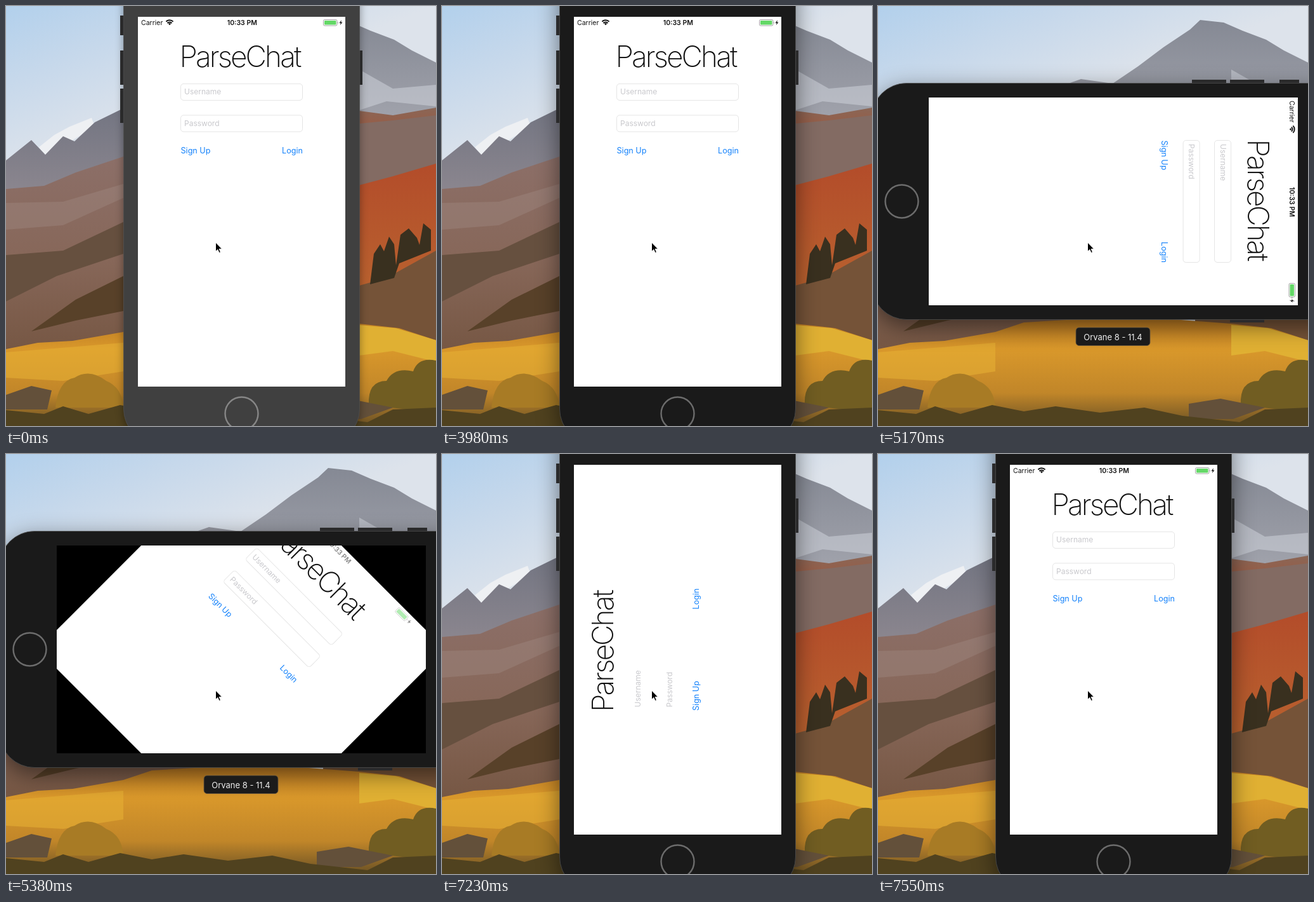
An HTML page for the animation above (8000 ms loop, 678x661 px).

```html
<!DOCTYPE html>
<html lang="en">
<head>
<meta charset="utf-8">
<title>Rotating login screen</title>
<style>
  html, body { margin: 0; width: 100%; height: 100%; overflow: hidden; }
  svg { display: block; width: 678px; height: 661px; font-family: Inter, Roboto, sans-serif; }
  .title { font-size: 46px; font-weight: 200; letter-spacing: -2.9px; fill: #111; }
  .hint { font-size: 12px; fill: #c9c9cd; }
  .link { font-size: 12.6px; fill: #1482fb; }
  .bar { font-size: 10.5px; fill: #111; }
  .label { font-size: 13px; fill: #eee; }
  .mid { text-anchor: middle; }
  .end { text-anchor: end; }
</style>
</head>
<body>
<svg viewBox="0 0 678 661">
  <defs>
    <linearGradient id="sky" gradientUnits="userSpaceOnUse" x1="0" y1="0" x2="90" y2="230">
      <stop stop-color="#b2d0ec"/><stop offset=".45" stop-color="#c6d8eb"/><stop offset="1" stop-color="#dde3eb"/>
    </linearGradient>
    <linearGradient id="peak" x2="0" y2="1">
      <stop stop-color="#858994"/><stop offset=".55" stop-color="#a0a2ab"/><stop offset="1" stop-color="#80706c"/>
    </linearGradient>
    <linearGradient id="ridge" x2="0" y2="1">
      <stop stop-color="#737582"/><stop offset="1" stop-color="#928b92"/>
    </linearGradient>
    <linearGradient id="slope" x2="0" y2="1">
      <stop stop-color="#8c6f68"/><stop offset=".5" stop-color="#876759"/><stop offset="1" stop-color="#745541"/>
    </linearGradient>
    <linearGradient id="autumn" x2="0" y2="1">
      <stop stop-color="#8a6656"/><stop offset=".3" stop-color="#b34c2a"/><stop offset="1" stop-color="#b9622f"/>
    </linearGradient>
    <linearGradient id="grove" x2="0" y2="1">
      <stop stop-color="#b87722"/><stop offset=".3" stop-color="#d9982b"/>
      <stop offset=".7" stop-color="#c18629"/><stop offset="1" stop-color="#6a5125"/>
    </linearGradient>
    <clipPath id="glass"><rect x="-163.5" y="-291" width="327" height="582"/></clipPath>
  </defs>

  <!-- landscape backdrop -->
  <rect width="678" height="661" fill="url(#sky)"/>
  <path fill="url(#peak)" d="M300 122L320 115 370 122 410 95 450 65 492 37 508 22 545 26 575 39 612 53 640 70 678 89V300H300Z"/>
  <path fill="#d3d7df" opacity=".5" d="M557 100L610 130 678 124V158L600 150 557 164Z"/>
  <path fill="url(#autumn)" d="M300 300L557 165 610 172 678 160V450H300Z"/>
  <path fill="#836b63" d="M557 185L610 180 678 172V248L610 268 557 282Z"/>
  <path fill="#eef0f3" d="M52 222L76 203 100 190 135 176 140 190 90 220 62 236Z"/>
  <path fill="url(#ridge)" d="M0 243L40 211 62 234 90 205 108 213 140 183 185 161 300 170V330H0Z"/>
  <path fill="url(#slope)" d="M0 288L60 283 110 262 185 237 380 300V560H0Z"/>
  <path fill="#a18a82" opacity=".4" d="M0 310L90 308 185 280V302L90 345 0 352Z"/>
  <path fill="#66503f" d="M0 392L90 385 185 340V390L80 425 0 465Z"/>
  <path fill="#584129" d="M40 512L110 462 185 425V480L110 495Z"/>
  <path fill="#755338" d="M500 455L557 440 600 428 678 385V540H500Z"/>
  <path fill="#39301f" d="M574 438L580 390 590 375 596 386 604 363 612 375 615 408 622 360 635 350 648 365 652 376 658 342 670 352V385L620 405 612 428Z"/>
  <path fill="url(#grove)" d="M0 540L50 530 105 527 185 513 230 498 400 488 557 500 620 507 678 526V661H0Z"/>
  <path fill="#e0b033" d="M557 502L615 507 678 526V560L610 543 557 550Z"/>
  <path fill="#e6af34" opacity=".6" d="M0 545L100 537 185 530V575L90 590 0 585Z"/>
  <path fill="#a87b25" d="M78 632Q82 590 108 585 132 570 158 590 183 600 185 632Z"/>
  <path fill="#715d22" d="M572 628Q570 590 600 590 612 568 642 575 650 552 678 558V640Z"/>
  <path fill="#63503a" d="M0 612L40 598 72 605 65 635H0ZM490 626L540 618 610 632 560 650H490Z"/>
  <path fill="#50421f" d="M0 636L60 642 90 630 130 642 180 628 230 638 280 630 350 640 420 632 480 645 570 655 610 635 678 632V661H0Z"/>

  <!-- device -->
  <rect id="shadow" x="-186" y="-381" width="372" height="762" rx="55"/>
  <g id="device">
    <path fill="#2a2a2b" d="M-191.500-293h8v31h-8zM-191.500-238h8v54h-8zM-191.500-178h8v54h-8zM182-238h8.500v54h-8.500z"/>
    <rect id="body" x="-186" y="-381" width="372" height="762" rx="55" stroke="#505050" stroke-width=".8"/>
    <circle id="home" cy="333.500" r="26" fill="none" stroke-width="2.400"/>
    <g clip-path="url(#glass)">
      <rect x="-163.500" y="-291" width="327" height="582"/>
      <g id="view">
        <rect id="paper" fill="#fff"/>
        <g id="status" class="bar">
          <text x="-158.500" y="13">Carrier</text>
          <g transform="translate(-113.500 13.200)" fill="none" stroke="#111" stroke-width="1.900">
            <path d="M-5.600-5.600A8 8 0 0 1 5.600-5.600M-3.500-3.200A4.800 4.800 0 0 1 3.500-3.200"/>
            <path fill="#111" stroke="none" d="M0 0L-2-2.200A3 3 0 0 1 2-2.200Z"/>
          </g>
          <text class="mid" x=".8" y="13" font-weight="600">10:33 PM</text>
          <rect x="129" y="4.500" width="21.500" height="9.500" rx="2" fill="#fff" stroke="#8d8d8d" stroke-width=".8"/>
          <rect x="130.500" y="6" width="18.500" height="6.500" rx="1" fill="#63d866"/>
          <path fill="#8d8d8d" d="M151.500 7.500q1.800 1.700 0 3.500z"/>
          <path d="M157.500 5L154 9.800H156.300L155.300 13.200 159 8.500H156.600Z"/>
        </g>
        <g id="form">
          <text class="title mid" x="-3" y="61.800">ParseChat</text>
          <g id="boxes" fill="none" stroke="#e5e5e5">
            <rect x="-96" y="88" width="192" height="26" rx="4.500"/>
            <rect x="-96" y="137.500" width="192" height="26" rx="4.500"/>
          </g>
          <text class="hint" x="-90.500" y="104.800">Username</text>
          <text class="hint" x="-90.500" y="154.500">Password</text>
          <text class="link" x="-96" y="197.200">Sign Up</text>
          <text class="link end" x="96.500" y="197.200">Login</text>
        </g>
      </g>
    </g>
  </g>

  <g id="tip">
    <rect x="312" y="506" width="117" height="28.500" rx="5" fill="#1b1b1b" stroke="#6a5a42" stroke-width=".8"/>
    <text class="label mid" x="370.500" y="525.700">Orvane 8 - 11.4</text>
  </g>
  <path stroke="#fff" stroke-width="1" d="M330.500 372V386.500L333.800 383.300 336.100 388.500 338.400 387.500 336.200 382.400H340.700Z"/>
</svg>

<script>
const LOOP = 8000, ACTIVE = 3980, TURN = 5170, BACK = 7230;
const $ = id => document.getElementById(id);
const set = (id, attrs) => {
  for (const key in attrs) $(id).setAttribute(key, attrs[key]);
};
const mix = (a, b, p) => a + (b - a) * p;

// Stepped, eased progress of a turn
function progress(t, start, steps, stepMs) {
  const p = Math.max(0, Math.min(1, Math.floor((t - start) / stepMs) / steps));
  return p * p * (3 - 2 * p);
}

function draw(t) {
  const active = t >= ACTIVE;
  const wide = t >= TURN && t < BACK;
  const back = t >= BACK;
  const p = wide ? progress(t, TURN, 6, 65) : back ? progress(t, BACK, 5, 64) : 1;
  const flat = wide ? p : back ? 1 - p : 0; // 0 = portrait layout, 1 = landscape layout
  const turn = wide ? 90 : 0;
  const angle = wide ? 90 * (1 - p) : back ? -90 * (1 - p) : 0;
  const w = mix(327, 582, flat), h = mix(582, 327, flat);
  const pose = `translate(${wide ? "371 307.5" : "371.5 308"}) rotate(${turn})`;

  set("device", { transform: pose });
  set("shadow", {
    transform: `translate(0 ${active ? 10 : 4}) ${pose}`,
    opacity: active ? .5 : .4,
    style: `filter: blur(${active ? 18 : 7}px)`
  });
  set("body", { fill: active ? "#1a1a1a" : "#404040" });
  set("home", { stroke: active ? "#6c6c6c" : "#868686" });
  set("view", { transform: `rotate(${angle - turn})` });
  set("paper", { x: -w / 2, y: -h / 2, width: w, height: h });
  set("status", { transform: `translate(0 ${-h / 2})`, opacity: 1 - flat });
  set("form", { transform: `translate(0 ${-h / 2 + 17.4 * (1 - flat)})` });
  set("boxes", { opacity: back ? p : 1 });
  set("tip", { visibility: wide ? "visible" : "hidden" });
}

const begin = performance.now();
function tick() {
  draw((performance.now() - begin) % LOOP);
  requestAnimationFrame(tick);
}
tick();
</script>
</body>
</html>
```
